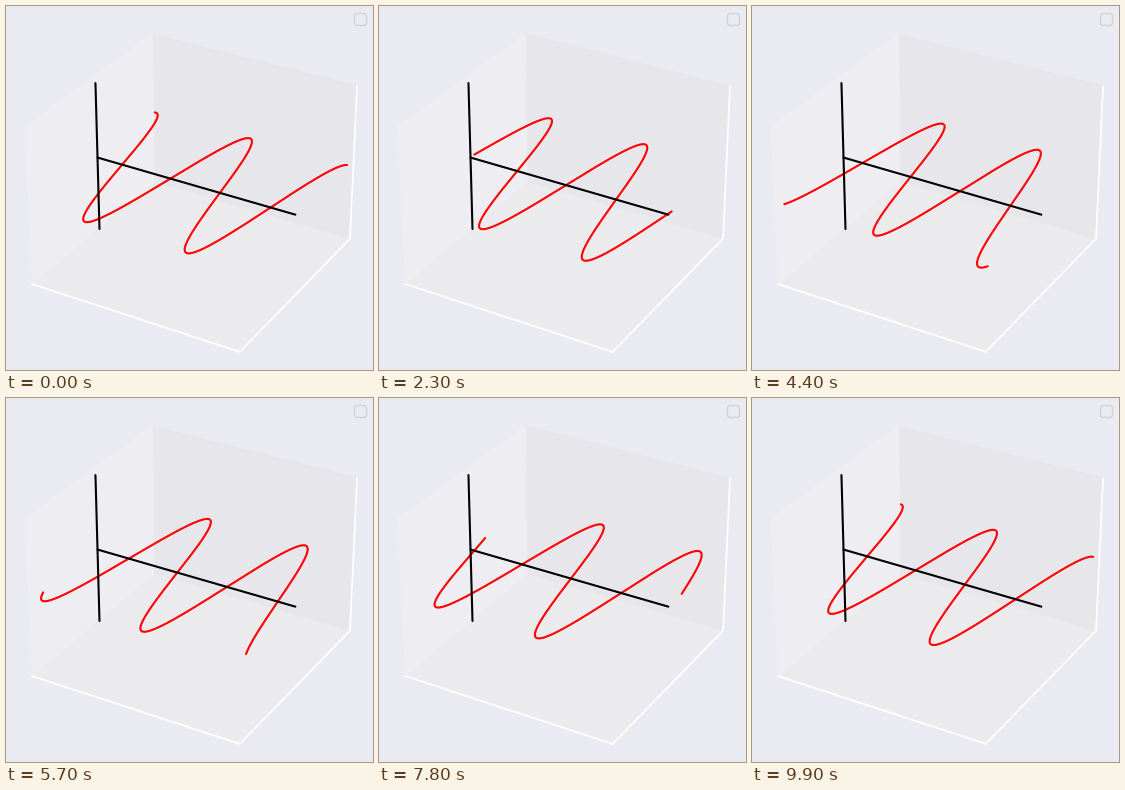
These frames come from a looping animation (367 by 364 pixels, 10000 ms). A matplotlib script:

```python
import numpy as np
import matplotlib.pyplot as plt
from matplotlib.animation import FuncAnimation

W, H, DPI = 367, 364, 100
FRAMES, INTERVAL = 100, 100
BG = "#EAEAF2"

plt.rcParams.update({
    "axes.facecolor": BG,
    "axes.edgecolor": "white",
    "axes.linewidth": 1.25,
    "lines.linewidth": 1.5,
    "lines.solid_capstyle": "round",
    "legend.fontsize": 11,
    "toolbar": "None",
})


def padded(lo, hi):
    """Limits with a small margin between the data and the panes."""
    pad = (hi - lo) / 48
    return lo - pad, hi + pad


fig = plt.figure(figsize=(W / DPI, H / DPI), dpi=DPI, facecolor=BG)

# The square axes run slightly past the edges of the figure.
side, left, top = 369.6, -1.8, -0.4
ax = fig.add_axes(
    [left / W, (H - top - side) / H, side / W, side / H], projection="3d"
)
ax.view_init(elev=30, azim=-60)
ax.grid(False)

x_max = 4 * np.pi
x = np.linspace(0, x_max, 400)
flat = np.zeros_like(x)
wave, = ax.plot(x, np.cos(x), flat, color="red")
ax.plot([0, x_max], [0, 0], [0, 0], color="black")
ax.plot([0, 0], [0, 0], [-1, 1], color="black")
ax.legend(handles=[], loc="upper right")

ax.set(xticks=[], yticks=[], zticks=[])
ax.set(xlim=padded(0, x_max), ylim=padded(-1, 1), zlim=padded(-1, 1))


def update(i):
    phase = 2 * np.pi * (i + 1) / FRAMES
    wave.set_data_3d(x, np.cos(x - phase), flat)
    return wave,


anim = FuncAnimation(fig, update, frames=FRAMES, interval=INTERVAL,
                     repeat=True, repeat_delay=0, blit=False)
plt.show()
```
